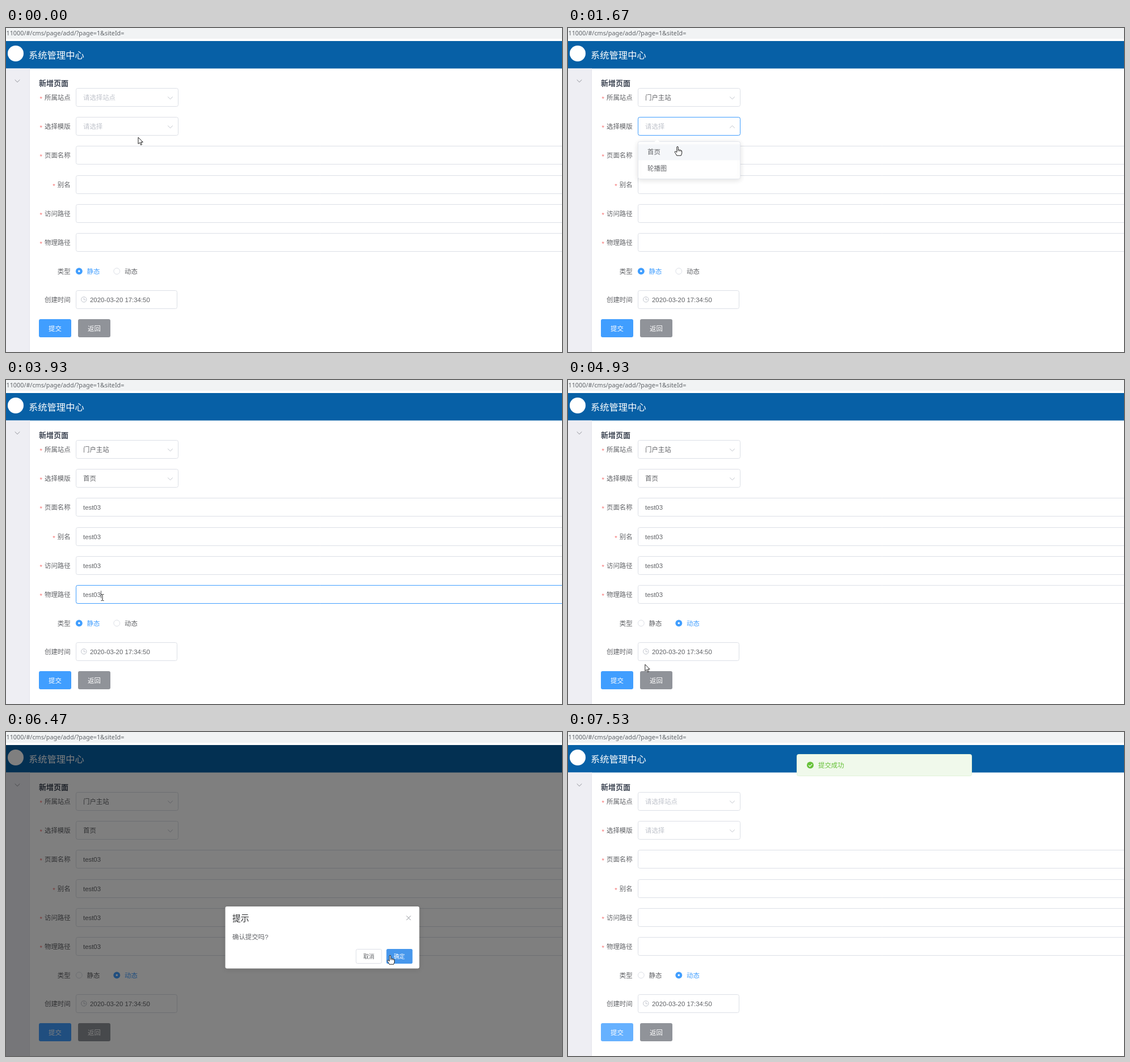
Recreate the animation shown at these times as an HTML page with a canvas. Size 980x572 px, loop 8 s.

```html
<!DOCTYPE html>
<html lang="zh">
<head>
<meta charset="utf-8">
<style>
html, body { margin: 0; width: 980px; height: 572px; overflow: hidden; background: #fff }
canvas { display: block }
</style>
</head>
<body>
<canvas id="stage" width="980" height="572"></canvas>
<script>
const LOOP = 8000;
const BLUE = '#409eff', LIGHT_BLUE = '#66b1ff', BORDER = '#dcdfe6', TEXT = '#606266', HINT = '#c0c4cc', GREY = '#909399';
const ctx = document.getElementById('stage').getContext('2d');

// Moments of the story, in ms
const SITE_OPEN = 430, SITE_PICK = 1130, TPL_OPEN = 1360, TPL_PICK = 1870;
const RADIO = 4430, HOVER = 5130, ASK = 5604, CONFIRM = 6500, DONE = 6850;

const inputs = [
  { label: '页面名称', y: 208.5, focus: 2200, blur: 2600, type: 2290 },
  { label: '别名', y: 260.5, focus: 2600, blur: 2930, type: 2680 },
  { label: '访问路径', y: 311.5, focus: 2930, blur: 3600, type: 3130 },
  { label: '物理路径', y: 362.5, focus: 3600, blur: 4180, type: 3720 }
];

// Pointer stops: time, x, y, shape used until the next stop
const pointer = [
  [0, 233, 193, 'arrow'], [70, 233, 193, 'arrow'], [260, 214, 138, 'hand'], [400, 203, 125, 'hand'],
  [600, 203, 125, 'hand'], [870, 192, 160, 'hand'], [1130, 192, 160, 'hand'], [1340, 190, 174, 'hand'],
  [1420, 190, 174, 'hand'], [1640, 193, 209, 'hand'], [1870, 193, 209, 'hand'], [1960, 190, 214, 'beam'],
  [2180, 180, 227, 'beam'], [2430, 180, 227, 'beam'], [2590, 174, 278, 'beam'], [2830, 174, 278, 'beam'],
  [2930, 171.5, 329, 'beam'], [3360, 171.5, 329, 'beam'], [3530, 170, 384, 'beam'], [3960, 170, 384, 'beam'],
  [4090, 178, 400, 'arrow'], [4320, 197, 427, 'hand'], [4500, 197, 427, 'hand'], [4620, 186, 446, 'arrow'],
  [4930, 136, 502, 'arrow'], [5130, 100, 524, 'hand'], [5560, 100, 524, 'hand'], [5610, 108, 523, 'arrow'],
  [5670, 123, 520, 'arrow'], [6260, 668, 402, 'hand'], [6400, 677, 394, 'hand'], [6600, 677, 394, 'hand'],
  [6720, 677, 394, 'arrow'], [7150, 640, 580, 'arrow'], [LOOP, 640, 580, 'arrow']
];

const ramp = (t, start, length) => Math.min(1, Math.max(0, (t - start) / length));
const easeOut = (p, power = 2) => 1 - (1 - p) ** power;
const pulse = (t, on, off, length, power) =>
  easeOut(ramp(t, on, length), power) * (1 - easeOut(ramp(t, off, length), power));
const between = (t, a, b) => t >= a && t < b;

function faded(alpha, draw) {
  if (alpha <= 0) return;
  ctx.save();
  ctx.globalAlpha *= alpha;
  draw();
  ctx.restore();
}

function rect(x, y, w, h, fill) {
  ctx.fillStyle = fill;
  ctx.fillRect(x, y, w, h);
}

function box(x, y, w, h, fill, stroke, radius = 3) {
  ctx.beginPath();
  ctx.roundRect(x, y, w, h, radius);
  if (fill) { ctx.fillStyle = fill; ctx.fill(); }
  if (stroke) { ctx.strokeStyle = stroke; ctx.lineWidth = 1; ctx.stroke(); }
}

function shadowed(blur, draw) {
  ctx.save();
  ctx.shadowColor = 'rgba(0,0,0,.12)';
  ctx.shadowBlur = blur;
  ctx.shadowOffsetY = 2;
  draw();
  ctx.restore();
}

function line(points, stroke, width = 1) {
  ctx.beginPath();
  points.forEach(([x, y]) => ctx.lineTo(x, y));
  ctx.strokeStyle = stroke;
  ctx.lineWidth = width;
  ctx.stroke();
}

function disc(x, y, r, fill, stroke) {
  ctx.beginPath();
  ctx.arc(x, y, r, 0, 7);
  if (fill) { ctx.fillStyle = fill; ctx.fill(); }
  if (stroke) { ctx.strokeStyle = stroke; ctx.lineWidth = 1; ctx.stroke(); }
}

// y is the visual middle of the line
function text(s, x, y, color = TEXT, size = 11.4, align = 'left', style = '', family = "'Liberation Sans','Noto Sans CJK SC'") {
  ctx.font = `${style} ${size}px ${family},sans-serif`;
  ctx.textAlign = align;
  ctx.fillStyle = color;
  ctx.fillText(s, x, y + size * .37);
}

function label(s, y, required = true) {
  text(s, 113.6, y, TEXT, 11.4, 'right');
  if (required) text('*', 113.6 - s.length * 11.4 - 8.6, y + 2, '#f56c6c');
}

function chevron(x, y, turn, color) {
  const d = 2.1 * (1 - 2 * turn);
  line([[x - 4.3, y - d], [x, y + d], [x + 4.3, y - d]], color);
}

function outline(x, y, w, h, focus) {
  box(x, y, w, h, '#fff', BORDER);
  faded(focus, () => box(x, y, w, h, null, BLUE));
}

function select(name, y, hint, value, open) {
  label(name, y + 16);
  outline(123.5, y, 180, 32, open);
  text(value || hint, 136, y + 16, value ? TEXT : HINT);
  chevron(289.5, y + 17, open, HINT);
}

function dropdown(y, items, open) {
  faded(open, () => {
    ctx.translate(0, y);
    ctx.scale(1, open);
    shadowed(10, () => box(123.5, 0, 180, 66, '#fff', '#e4e7ed'));
    ctx.beginPath();
    ctx.moveTo(152, 1);
    ctx.lineTo(157, -4);
    ctx.lineTo(162, 1);
    ctx.fillStyle = '#fff';
    ctx.fill();
    rect(124, 5, 179, 28, '#f5f7fa');
    items.forEach((s, i) => text(s, 140, 18.5 + i * 28.3));
  });
}

function radio(x, name, on) {
  disc(x, 429.3, 5.4, '#fff', BORDER);
  faded(on, () => {
    disc(x, 429.3, 5.9, BLUE);
    disc(x, 429.3, 1.7 * on, '#fff');
  });
  text(name, x + 13.8, 429.3, on > .5 ? BLUE : TEXT);
}

function button(x, name, fill) {
  box(x, 514, 57, 32, fill);
  text(name, x + 28.5, 530.3, '#fff', 11.4, 'center');
}

function drawForm(t) {
  const cleared = t >= DONE;
  rect(0, 0, 980, 19, '#f1f3f4');
  text('11000/#/cms/page/add/?page=1&siteId=', .5, 9, '#5f6368', 10.8, 'left', '', "'Noto Sans'");
  rect(0, 23, 980, 48.5, '#0760a6');
  disc(17, 45, 14, '#fff');
  text('系统管理中心', 40, 47.5, '#fff', 16.3);
  rect(0, 71.5, 42, 501, '#eeeef3');
  rect(41, 71.5, 1, 501, '#e6e6ec');
  chevron(20, 93.5, 0, GREY);
  text('新增页面', 58, 97.5, '#3a4250', 13, 'left', 'bold');

  const siteOpen = pulse(t, SITE_OPEN, SITE_PICK, 250, 3);
  const tplOpen = pulse(t, TPL_OPEN, TPL_PICK, 250, 3);
  select('所属站点', 106.5, '请选择站点', between(t, SITE_PICK, DONE) && '门户主站', siteOpen);
  select('选择模版', 157.5, '请选择', between(t, TPL_PICK, DONE) && '首页', tplOpen);

  for (const { label: name, y, focus, blur, type } of inputs) {
    label(name, y + 16);
    outline(123.5, y, 900, 32, pulse(t, focus, blur, 200));
    const value = cleared ? '' : 'test03'.slice(0, Math.max(0, Math.ceil((t - type) / 25)));
    text(value, 136, y + 16);
    if (between(t, focus, blur) && (t - focus) % 1000 < 500)
      rect(136 + ctx.measureText(value).width, y + 9.5, 1, 13, TEXT);
  }

  const dynamic = ramp(t, RADIO, 150);
  label('类型', 429.3, false);
  radio(128.8, '静态', 1 - dynamic);
  radio(195.3, '动态', dynamic);

  label('创建时间', 479.5, false);
  box(123.5, 463.5, 178, 32, '#fff', BORDER);
  disc(137.3, 479.3, 4.7, null, HINT);
  line([[137.3, 476.3], [137.3, 479.8], [140.3, 479.8]], HINT);
  text('2020-03-20 17:34:50', 148, 479.5);

  button(58, '提交', between(t, HOVER, ASK) || t >= CONFIRM ? LIGHT_BLUE : BLUE);
  button(127, '返回', GREY);

  dropdown(149.5, ['门户主站', '测试站点'], siteOpen);
  dropdown(200.5, ['首页', '轮播图'], tplOpen);
}

function drawDialog(t) {
  faded(.5 * pulse(t, ASK, CONFIRM, 200), () => rect(0, 23, 980, 549, '#000'));
  const shown = pulse(t, ASK, CONFIRM, 300);
  faded(shown, () => {
    ctx.translate(0, -16.6 * (1 - shown));
    shadowed(10, () => box(386.5, 308, 342, 109.5, '#fff'));
    text('提示', 399, 329, '#303133', 14.8);
    line([[705.8, 324.5], [713.4, 332.1]], GREY);
    line([[713.4, 324.5], [705.8, 332.1]], GREY);
    text('确认提交吗?', 399, 362);
    box(617, 383.5, 45, 25, '#fff', BORDER, 2.5);
    text('取消', 639.5, 396, TEXT, 9.8, 'center');
    box(670.5, 383, 46, 26, t > 6260 ? '#4797ec' : BLUE, null, 2.5);
    text('确定', 693.3, 396, '#fff', 9.8, 'center');
  });
}

function drawMessage(t) {
  const p = easeOut(ramp(t, DONE, 400));
  faded(easeOut(ramp(t, DONE, 300)), () => {
    ctx.beginPath();
    ctx.rect(0, 23, 980, 549);
    ctx.clip();
    ctx.translate(0, -38 * (1 - p));
    box(403.5, 39.5, 308, 38, '#f0f9eb', '#e1f3d8');
    disc(427, 58.5, 6, '#67c23a');
    line([[424, 58.6], [426.3, 60.8], [430.2, 56.6]], '#fff', 1.2);
    text('提交成功', 441, 58.5, '#67c23a');
  });
}

const shapes = {
  arrow: new Path2D('M0 0V11.6L2.7 9.2L4.6 13.5L6.5 12.7L4.6 8.5H8.3Z'),
  hand: new Path2D('M-1.2 1Q0 -.6 1.2 1V6L2.6 5.6L3.6 6.5L5 6.2L6 7.2Q7.7 7 7.7 8.8V12Q7.3 14 6.2 16.2H-1.4Q-2.6 13 -4.8 10.4Q-5 8.3 -3.2 8.9L-1.2 10.6Z'),
  beam: new Path2D('M-2.5 -5.5H-.8L0 -4.7L.8 -5.5H2.5M0 -4.7V4.7M-2.5 5.5H-.8L0 4.7L.8 5.5H2.5')
};

function drawPointer(t) {
  const i = pointer.findIndex(stop => stop[0] > t) - 1;
  const [start, x0, y0, shape] = pointer[i], [end, x1, y1] = pointer[i + 1];
  const p = ramp(t, start, end - start);
  ctx.save();
  ctx.translate(x0 + (x1 - x0) * p, y0 + (y1 - y0) * p);
  ctx.fillStyle = '#fff';
  ctx.strokeStyle = '#222';
  ctx.lineWidth = 1;
  if (shape !== 'beam') ctx.fill(shapes[shape]);
  ctx.stroke(shapes[shape]);
  if (shape === 'hand') ctx.stroke(new Path2D('M1.2 6V8.5M3.6 6.5V8.8M6 7.2V9'));
  ctx.restore();
}

function frame() {
  const t = performance.now() % LOOP;
  rect(0, 0, 980, 572, '#fff');
  drawForm(t);
  drawDialog(t);
  drawMessage(t);
  drawPointer(t);
  requestAnimationFrame(frame);
}
frame();
</script>
</body>
</html>
```
